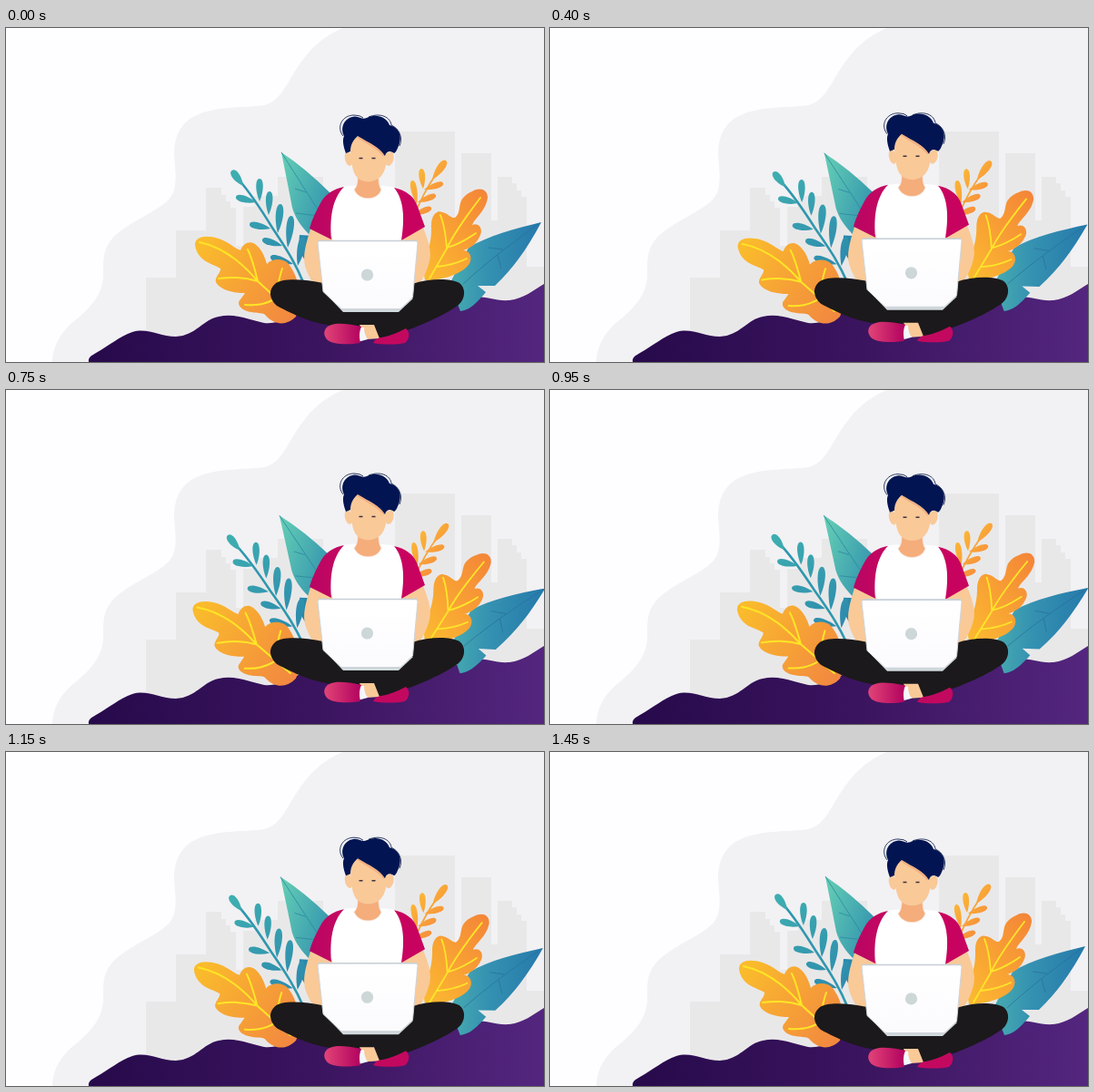
Write an HTML page that moves like this. It is 592 px wide and 368 px high and loops after 1.5 s.

```html
<!DOCTYPE html>
<html lang="en">
<head>
<meta charset="utf-8">
<title>Working outdoors</title>
<style>
  html, body { margin: 0; width: 100%; height: 100%; overflow: hidden; background: #fefdff; }
  svg { display: block; width: 592px; height: 368px; }
</style>
</head>
<body>
<svg viewBox="0 0 592 368" xmlns="http://www.w3.org/2000/svg">
  <defs>
    <linearGradient id="hill"><stop stop-color="#270a4b"/><stop offset=".5" stop-color="#3b145f"/><stop offset="1" stop-color="#54267f"/></linearGradient>
    <linearGradient id="amber" x1="0" y1=".2" x2="1" y2=".8"><stop stop-color="#fabb2c"/><stop offset="1" stop-color="#f28840"/></linearGradient>
    <linearGradient id="orange" x1="0" y1="1" x2=".9" y2="0"><stop stop-color="#fcbc30"/><stop offset="1" stop-color="#f48638"/></linearGradient>
    <linearGradient id="teal" x1="0" y1=".2" x2="1" y2=".8"><stop stop-color="#62cbb4"/><stop offset="1" stop-color="#3090ae"/></linearGradient>
    <linearGradient id="blue"><stop stop-color="#48acb0"/><stop offset=".4" stop-color="#3592b1"/><stop offset="1" stop-color="#2579ab"/></linearGradient>
    <linearGradient id="sprigL" gradientUnits="userSpaceOnUse" x1="250" y1="160" x2="326" y2="276"><stop stop-color="#3eaeb0"/><stop offset="1" stop-color="#2a86ad"/></linearGradient>
    <linearGradient id="sprigR" gradientUnits="userSpaceOnUse" x1="448" y1="160" x2="484" y2="190"><stop stop-color="#fbb836"/><stop offset="1" stop-color="#f68b3c"/></linearGradient>
    <linearGradient id="sleeve"><stop stop-color="#b80562"/><stop offset="1" stop-color="#c50861"/></linearGradient>
    <linearGradient id="shoe"><stop stop-color="#e24477"/><stop offset="1" stop-color="#b1015f"/></linearGradient>
    <linearGradient id="lid" x1="0" y1="0" x2="0" y2="1"><stop stop-color="#fff"/><stop offset="1" stop-color="#fbfbfe"/></linearGradient>
  </defs>

  <rect width="592" height="368" fill="#fefdff"/>
  <path fill="#f2f1f4" d="M371 0C341 12 326 34 313 56C302 75 294 86 276 86C250 88 224 87 204 99C189 109 185 124 185 141C187 161 189 179 179 189C163 205 133 214 117 232C106 245 107 257 107 275C105 296 92 308 80 319C63 332 52 346 51 368H592V0Z"/>
  <path fill="#e9e8e9" d="M154 368V275H187V223H220V176H237V184H242V191H247V198H253V240H261V197H273V185H299V164H349V240H428V114H494V215H501V138H534V212H541V164H557V171H562V179H567V186H573V263H592V368Z"/>
  <path fill="url(#hill)" d="M91 368C90 363 94 361 99 358C113 350 125 340 139 335C156 330 169 340 187 340C209 339 217 321 234 318C252 314 266 321 284 325C302 327 312 316 330 311L490 305C500 301 508 297 517 296C530 296 539 301 554 300C570 298 580 289 592 282V368Z"/>

  <g id="bladeL">
    <path fill="url(#teal)" d="M303 137Q330 155 357 182L347 232L335 229C325 219 318 209 315 198C311 177 307 157 303 137Z"/>
    <path fill="none" stroke="#2c88a2" stroke-width=".8" d="M303 137L350 211M318 177L330 181M319 204L344 207"/>
    <path fill="#2888ac" d="M323 228L340 229L337 263C326 256 321 244 323 228Z"/>
  </g>
  <g id="twigL" fill="url(#sprigL)"><path fill="none" stroke="#2f97ae" stroke-width="2.6" d="M256 167C271 184 282 202 293 220C307 241 318 258 327 280"/></g>
  <g id="twigR" fill="url(#sprigR)"><path fill="none" stroke="#f8a53a" stroke-width="1.8" d="M474 160Q459 181 447 212"/></g>
  <g id="bladeR">
    <path fill="url(#blue)" d="M589 214C560 221 530 229 509 242L488 282L500 312C510 311 518 303 528 291L519 284L538 284C562 261 576 238 589 214Z"/>
    <path fill="none" stroke="#286f99" stroke-width=".7" d="M587 215C557 237 530 257 503 282M547 244L531 242M541 250L545 265"/>
  </g>
  <g id="leafL">
    <path fill="url(#amber)" d="M208 239C208 229 221 228 234 232C244 235 252 243 258 245C261 237 268 234 274 238C282 244 285 253 287 260C293 253 306 254 311 260C320 271 329 298 319 318C309 328 296 328 286 317C284 313 277 315 270 313C258 311 253 304 258 299L263 292C248 292 235 288 231 280C229 275 237 269 236 265C230 261 223 260 217 255C212 251 209 246 208 239Z"/>
    <path fill="none" stroke="#ffe526" stroke-width="2" stroke-linecap="round" d="M213 236C241 242 262 261 277 279L313 312M277 279C274 267 271 254 266 244M277 279C261 274 248 274 234 276M297 298C284 305 275 306 263 305M297 297C299 284 301 273 304 265"/>
  </g>
  <g id="leafR">
    <path fill="url(#orange)" d="M513 180C522 175 530 178 530 187C528 202 515 210 513 217C520 214 525 221 522 228C518 238 510 243 503 245C511 245 514 254 509 261C500 272 479 278 461 278L458 260C465 246 468 236 468 221C467 208 473 200 480 203C486 204 490 210 494 209C500 204 498 197 501 190C504 185 508 182 513 180Z"/>
    <path fill="none" stroke="#ffe52a" stroke-width="1.8" stroke-linecap="round" d="M522 187C506 208 493 226 485 243L466 276M485 242C484 229 482 216 478 206M485 242C497 239 507 233 517 226M474 263C487 262 497 259 507 254"/>
  </g>

  <g id="person">
    <g fill="#f9c998">
      <path d="M336 218C331 235 326 249 329 262C333 276 341 286 350 294L367 235Z"/>
      <path d="M458 217C464 233 469 245 466 257C462 273 455 283 445 293L433 235Z"/>
    </g>
    <path fill="#1b191b" d="M349 281C329 277 304 275 296 282C289 288 289 298 298 306C317 316 338 327 369 329L405 327L410 342C442 335 481 318 498 305C506 298 506 286 499 281C488 275 465 276 447 282Z"/>
    <path fill="#f9c998" d="M389 327H405L411 342L397 343Z"/>
    <path fill="#f4f8fc" d="M385 330L394 330C394 336 396 340 398 343L387 346Z"/>
    <path fill="url(#shoe)" d="M352 331C358 324 371 325 391 329C388 336 389 342 390 347C376 349 361 349 354 344C350 340 349 335 352 331Z"/>
    <path fill="#c3095f" d="M404 347C406 343 409 341 413 341C424 339 432 335 440 331C445 335 444 343 439 347C429 349 414 349 404 347Z"/>
    <path fill="#fff" d="M371 175C382 173 417 173 428 176C438 188 439 210 436 238H360C356 214 357 191 371 175Z"/>
    <path fill="url(#sleeve)" d="M372 175C361 177 351 183 346 193C340 204 336 213 334 221L358 233C356 209 359 188 372 175Z"/>
    <path fill="#c8035f" d="M427 176C440 179 449 185 453 197L461 219L435 234C439 210 438 189 427 176Z"/>
    <path fill="#f4ad7b" stroke="#fae8df" stroke-width=".8" d="M387 163H410C410 171 411 175 413 178C409 191 388 191 383 178C386 175 387 171 387 163Z"/>
    <ellipse cx="377" cy="144" rx="4" ry="8" fill="#f9c998" transform="rotate(-13 377 144)"/>
    <ellipse cx="422" cy="144" rx="4.5" ry="8" fill="#f9c998" transform="rotate(13 422 144)"/>
    <path fill="#f9c998" d="M378 126L388 116L420 134C419 148 418 158 412 164C405 171 393 171 387 165C380 159 380 145 378 126Z"/>
    <path fill="none" stroke="#f3ae80" stroke-width="2" d="M387 120C398 128 409 131 416 141"/>
    <path fill="#021552" d="M374 138C371 130 370 123 372 119C367 109 373 98 384 97.500C390 98 392 101 397 99C407 94 419 98 422 107C431 109 436 117 433 127C431 133 429 137 427 138C421 134 418 137 417 141C411 131 400 127 387 119C381 124 379 130 379 136Z"/>
    <path fill="none" stroke="#172651" stroke-width=".9" d="M371 119C363 109 370 96 383 96Q390 96 393 99M399 98C412 93 423 98 424 107C433 111 437 121 433 130"/>
    <path stroke="#3c3340" stroke-width="1.5" d="M388.500 143.500H392.500M402.500 143.500H406.500"/>
    <path fill="#d0d8dc" d="M349 290L371 313H432L448 298Z"/>
    <path fill="url(#lid)" stroke="#cdd4da" d="M345 234.500H451Q453 234.500 453 237L447.500 297L434 309.500H369L349 290.500L343 237Q343 234.500 345 234.500Z"/>
    <path stroke="#c8d0d6" stroke-width="1.6" d="M344 234.500H452"/>
    <circle cx="397.500" cy="272" r="6.600" fill="#cdd7d8"/>
  </g>
</svg>
<script>
const PERIOD = 1500, STEP = 50, LIFT = 4;
const byId = id => document.getElementById(id);

// Teardrop from its round outer end (x1, y1) to its stalk (x2, y2).
function addLeaf(group, [x1, y1, x2, y2, w]) {
  const dx = x2 - x1, dy = y2 - y1, len = Math.hypot(dx, dy);
  const leaf = document.createElementNS("http://www.w3.org/2000/svg", "path");
  const at = (along, side) =>
    (x1 + dx * along - dy / len * side) + " " + (y1 + dy * along + dx / len * side);
  leaf.setAttribute("d", `M${at(0, 0)}C${at(0, w)} ${at(.55, w)} ${at(1, 0)}C${at(.55, -w)} ${at(0, -w)} ${at(0, 0)}Z`);
  group.append(leaf);
}

const sprigs = {
  twigL: [
    [248.5, 157, 261, 174, 5.5], [253, 186, 275, 192, 5], [268, 216, 291, 221, 5],
    [282, 233, 304, 240, 5], [291, 252, 316, 260, 5], [279, 166, 279, 191, 5],
    [290, 180, 289, 206, 5], [302, 194, 299, 226, 5.5], [314, 207, 310, 242, 5.5],
    [327, 230, 321, 262, 5.5]
  ],
  twigR: [
    [484, 146, 469, 167, 5.5], [457, 155, 459, 177, 4.5], [447, 168, 452, 194, 4.5],
    [481, 171, 460, 178, 4.5], [473, 184, 453, 192, 4.5], [468, 198, 448, 206, 4.5]
  ]
};
for (const id in sprigs) sprigs[id].forEach(leaf => addLeaf(byId(id), leaf));

// Degrees at full sway, then the pivot.
const sways = {
  bladeL: [-1.4, 355, 225], twigL: [-2.1, 327, 280], leafL: [-1.9, 315, 318],
  bladeR: [2.9, 500, 300], twigR: [1.9, 447, 212], leafR: [2.4, 465, 278]
};

function draw(time) {
  const t = Math.floor(time % PERIOD / STEP) * STEP;
  const k = (1 - Math.cos(2 * Math.PI * t / PERIOD)) / 2;
  byId("person").setAttribute("transform", `translate(0 ${-LIFT * k})`);
  for (const id in sways) {
    const [deg, x, y] = sways[id];
    byId(id).setAttribute("transform", `rotate(${deg * k} ${x} ${y})`);
  }
}

const start = performance.now();
function tick(now) {
  draw(Math.max(0, now - start));
  requestAnimationFrame(tick);
}
draw(0);
requestAnimationFrame(tick);
</script>
</body>
</html>
```
